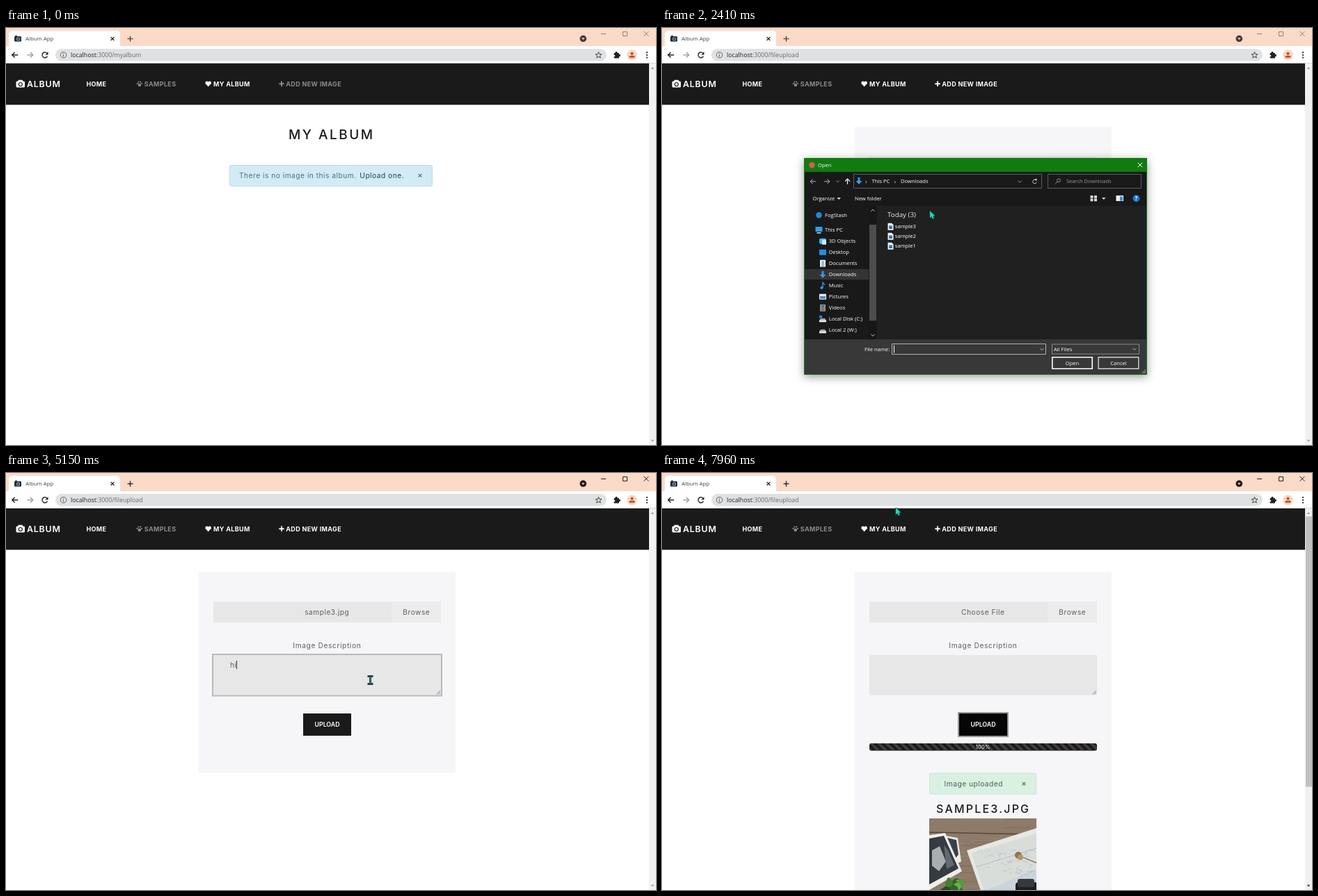
These frames come from a looping animation (934x600 px, 8000 ms). An HTML page with a canvas:

```html
<!DOCTYPE html>
<html lang="en">
<head>
<meta charset="utf-8">
<title>Album App</title>
<style>
html, body { margin: 0; width: 100%; height: 100%; overflow: hidden; background: #fff; }
canvas { display: block; }
</style>
</head>
<body>
<canvas id="stage" width="934" height="600"></canvas>
<script>
const W = 934, H = 600, LOOP = 8000, MAX_SCROLL = 193;
const UI = '"Open Sans", "Noto Sans", sans-serif';
const WEB = 'Inter, Lato, sans-serif';
const screen = document.getElementById('stage').getContext('2d');
let c = screen;

// Drawing helpers
function layer(w, h) {
  const el = document.createElement('canvas');
  el.width = w;
  el.height = h;
  return el.getContext('2d');
}
function rect(x, y, w, h, color, r = 0) {
  c.fillStyle = color;
  c.beginPath();
  c.roundRect(x, y, w, h, r);
  c.fill();
}
function frame(x, y, w, h, color, lw = 1, r = 0) {
  c.strokeStyle = color;
  c.lineWidth = lw;
  c.beginPath();
  c.roundRect(x + lw / 2, y + lw / 2, w - lw, h - lw, r);
  c.stroke();
}
function disc(x, y, r, color) {
  c.fillStyle = color;
  c.beginPath();
  c.arc(x, y, r, 0, 7);
  c.fill();
}
function arc(x, y, r, color, lw, a = 0, b = 2 * Math.PI) {
  c.strokeStyle = color;
  c.lineWidth = lw;
  c.beginPath();
  c.arc(x, y, r, a, b);
  c.stroke();
}
function trace(p) {
  c.beginPath();
  for (let i = 0; i < p.length; i += 2) c.lineTo(p[i], p[i + 1]);
}
function line(color, lw, ...p) {
  c.strokeStyle = color;
  c.lineWidth = lw;
  trace(p);
  c.stroke();
}
function poly(color, ...p) {
  c.fillStyle = color;
  trace(p);
  c.fill();
}
function cross(x, y, r, color, lw = 1) {
  line(color, lw, x - r, y - r, x + r, y + r);
  line(color, lw, x + r, y - r, x - r, y + r);
}
function plus(x, y, r, color, lw) {
  line(color, lw, x - r, y, x + r, y);
  line(color, lw, x, y - r, x, y + r);
}
function chevron(x, y, r, color, dir = 1) {
  line(color, 1, x - r, y - dir * r / 2, x, y + dir * r / 2, x + r, y - dir * r / 2);
}
function arrow(x, y, r, dx, dy, color, lw) {
  const tx = x + dx * r, ty = y + dy * r, k = r * 0.9;
  line(color, lw, x - dx * r, y - dy * r, tx, ty);
  line(color, lw, tx - (dx + dy) * k, ty - (dy + dx) * k, tx, ty, tx - (dx - dy) * k, ty - (dy - dx) * k);
}
function text(s, x, y, font, color, spacing = 0, align = 'left') {
  c.font = font;
  c.fillStyle = color;
  c.letterSpacing = spacing + 'px';
  c.textAlign = align;
  c.fillText(s, align === 'center' ? x + spacing / 2 : x, y);
}
const ui = (s, x, y, color = '#fff', size = 7.6) => text(s, x, y, `${size}px ${UI}`, color);
const body = (s, x, y, color = '#5b6063', align = 'center') =>
  text(s, x, y, `10.2px ${WEB}`, color, 0.5, align);

// Browser window
function drawBrowser(t) {
  const active = (t >= 850 && t < 2030) || t >= 3740;
  const ink = active ? '#222' : '#8f7f76';
  rect(0, 0, W, 27, '#fcdac8');
  rect(4, 4, 160, 30, '#fff', 5);
  rect(0, 26, W, 25, '#fff');
  rect(0, 50, W, 1, '#d9dbdd');
  rect(12, 12, 10, 7.5, '#26303a', 1);
  rect(13, 10.8, 3, 2, '#26303a');
  disc(17.5, 15.8, 2.5, '#8fa3ad');
  disc(17.5, 15.8, 1.4, '#26303a');
  ui('Album App', 28, 18, '#3c4043', 7.8);
  cross(153, 15.3, 2.4, '#222', 1.3);
  plus(178.5, 15.5, 4, active ? '#222' : '#4c423c', 1.3);
  disc(829.3, 15.3, 4.8, active ? '#1d1a18' : '#463c37');
  poly('#fcdac8', 827, 14.2, 831.6, 14.2, 829.3, 17);
  line(ink, 1, 855, 8.5, 862, 8.5);
  frame(886, 5, 7, 7, ink);
  cross(920, 8.3, 3.4, ink);

  arrow(13, 38.8, 4.2, -1, 0, '#222', 1.5);
  arrow(34.5, 38.8, 4.2, 1, 0, '#999', 1.3);
  arc(56, 38.8, 3.9, '#222', 1.5, 0.5, 5.4);
  poly('#222', 60.5, 34.2, 60.5, 38.4, 56.3, 38.4);
  rect(71, 30, 792, 17.5, '#dfe1e2', 8.7);
  arc(82.5, 38.8, 4.2, '#5f6368', 1);
  line('#5f6368', 1.1, 82.5, 38.2, 82.5, 41.3);
  disc(82.5, 36.6, 0.7, '#5f6368');
  text('localhost', 93, 42, `8.8px ${UI}`, '#202124');
  const w = c.measureText('localhost').width;
  text(t < 1100 ? ':3000/myalbum' : ':3000/fileupload', 93 + w, 42, `8.8px ${UI}`, '#666b70');

  const star = [];
  for (let i = 0; i < 11; i++) {
    const a = i * Math.PI / 5 - Math.PI / 2, r = i % 2 ? 2 : 4.7;
    star.push(851.5 + r * Math.cos(a), 39.2 + r * Math.sin(a));
  }
  line('#444', 1, ...star);
  rect(873.5, 36, 7.5, 7.5, '#222', 1);
  disc(877, 35.7, 1.7, '#222');
  disc(881.3, 39.5, 1.7, '#222');
  disc(874, 40, 1.2, '#fff');
  disc(899.5, 38.8, 7.2, '#fbd3bf');
  disc(899.5, 36.7, 2, '#bf4f14');
  rect(895.6, 39.7, 7.8, 3, '#bf4f14', [2, 2, 0, 0]);
  for (const y of [35.2, 38.9, 42.6]) disc(921, y, 1.1, '#222');
}

// Site header
function drawNav(t) {
  const grey = '#8b8b8b', add = t < 850 ? grey : '#fff';
  const item = (s, x, color) => text(s, x, 83.5, `700 9px ${WEB}`, color, 0.35);
  rect(0, 51, 924, 59.5, '#1a1a1a');
  rect(14.5, 76.5, 12.5, 9, '#fff', 1.5);
  rect(17.5, 74.7, 6.5, 3, '#fff', 1);
  arc(20.8, 81, 2.5, '#1a1a1a', 1.2);
  text('ALBUM', 30, 84.7, `600 12.4px ${WEB}`, '#fff', 0.8);
  item('HOME', 115.5, '#fff');
  disc(191.8, 82, 2.3, grey);
  for (const [x, y] of [[188.6, 80], [190.4, 77.6], [193.2, 77.6], [195, 80]]) disc(x, y, 1.1, grey);
  item('SAMPLES', 198.8, grey);
  disc(288.6, 78.9, 2.3, '#fff');
  disc(292.6, 78.9, 2.3, '#fff');
  poly('#fff', 286.5, 79.8, 294.7, 79.8, 290.6, 84.4);
  item('MY ALBUM', 298, '#fff');
  plus(396, 80.3, 3.7, add, 1.9);
  item('ADD NEW IMAGE', 402.3, add);
}

function drawEmptyAlbum() {
  text('MY ALBUM', 466.5, 160.3, `500 19px ${WEB}`, '#1a1a1a', 2.5, 'center');
  rect(321, 197, 292, 31, '#d3ebf5', 3);
  frame(321, 197, 292, 31, '#b9dfea', 1, 3);
  body('There is no image in this album.', 335, 215.5, '#4d707c', 'left');
  body('Upload one.', 508.3, 215.5, '#264049', 'left');
  cross(595, 212.3, 2.3, '#60757d', 1.3);
}

// Photo of a desk in flat shapes
function paintPhoto() {
  const prev = c;
  let seed = 7;
  const rnd = () => (seed = seed * 16807 % 2147483647) / 2147483647;
  c = layer(154, 231);
  rect(0, 0, 154, 231, '#8d7a68');
  for (let i = 0; i < 60; i++)
    rect(rnd() * 150 - 30, rnd() * 231, 20 + rnd() * 50, 1, i % 2 ? '#a08d7a88' : '#6f5d4f77');
  for (const y of [20, 108, 152]) line('#54473c', 1.5, 0, y, 154, y + 3);
  poly('#ece9e2', 18, 24, 41, 28, 46, 62, 30, 70);
  poly('#39424c', 22, 27, 39, 31, 42, 52, 34, 62);
  poly('#efeeea', 0, 24, 23, 21, 47, 76, 0, 103);
  poly('#343b42', 0, 29, 21, 25, 42, 72, 0, 95);
  poly('#a9aeb1', 4, 46, 15, 40, 24, 62, 14, 76, 4, 68);
  poly('#626b72', 21, 38, 27, 46, 36, 67, 25, 73);
  poly('#e7e7e3', 54, 46, 154, 14, 154, 171, 103, 188);
  poly('#c9d5da', 61, 50, 154, 22, 154, 160, 105, 180);
  poly('#d9ddda', 61, 50, 154, 22, 154, 73, 80, 104);
  for (let i = 0; i < 55; i++) {
    const x = 68 + rnd() * 80, y = 45 + rnd() * 38;
    line('#9caab099', 0.7, x, y, x + rnd() * 9, y - 5 + rnd() * 9);
  }
  line('#a6bac3', 0.8, 67, 70, 154, 43);
  line('#a6bac3', 0.8, 89, 135, 132, 116);
  line('#7d6346', 1.2, 132, 55, 154, 64);
  disc(128, 53, 5, '#8f7350');
  disc(131, 56, 4, '#b39568');
  rect(124, 92, 34, 62, '#1c1f21', 4);
  rect(127, 87, 24, 12, '#34393b', 3);
  for (const [r, color] of [[17, '#2d3234'], [14, '#8e9697'], [12, '#171a1c'], [7, '#4e585c'], [4, '#111']])
    disc(143, 124, r, color);
  const greens = ['#2e6428', '#40802f', '#569b3b', '#6cae4e', '#254d24'];
  poly('#2b4f29', 0, 112, 28, 95, 52, 120, 60, 165, 80, 190, 74, 231, 0, 231);
  for (let i = 0; i < 210; i++) {
    const y = 88 + rnd() * 143;
    const edge = y < 110 ? 50 : y < 150 ? 58 : y < 190 ? 74 : 80;
    const x = (y < 108 ? 25 : 0) + rnd() * (edge - (y < 108 ? 25 : 0));
    disc(x, y, 2.5 + rnd() * 3.5, greens[i % 5]);
  }
  const el = c.canvas;
  c = prev;
  return el;
}
const photo = paintPhoto();

// Upload form
function drawForm(t) {
  const done = t >= 6400, loaded = t >= 6650;
  const field = '#e7e7e7', focus = '#bababa';
  rect(276.5, 142.5, 369.5, (loaded ? 770 : done ? 554 : 431) - 142.5, '#f6f6f8');
  rect(298, 185.5, 327, 29.5, field);
  rect(554, 185.5, 71, 29.5, '#ececed');
  if (t >= 3740 && t < 4270) frame(296, 183.5, 331, 33.5, focus, 2);
  body(t >= 3740 && !done ? 'sample3.jpg' : 'Choose File', 461, 203.5);
  body('Browse', 589.5, 203.5);
  text('Image Description', 461, 252, `10.2px ${WEB}`, '#5b6063', 0.62, 'center');
  rect(298, 262, 327, 57.5, field);
  line('#666', 0.8, 618.5, 318.5, 624, 313);
  line('#666', 0.8, 621.5, 318.5, 624, 316);
  if (t >= 4270 && t < 6250) frame(296, 260, 331, 61.5, focus, 2);

  const typed = t < 5070 ? '' : t < 5150 ? 'h' : 'hi';
  if (t >= 4270 && !done) {
    if (typed) body(typed, 322, 280, '#5b6063', 'left');
    const caret = t < 4770 || (t >= 5070 && t < 5610) || (t >= 6100 && t < 6250);
    if (caret) rect([322, 329, 331][typed.length], 270, 1, 12, '#333');
  }

  if (t >= 6250) {
    rect(425, 344, 73, 36, '#979797');
    rect(427, 346, 69, 32, '#060606');
  } else rect(427, 346, 69, 32, t >= 6030 ? '#060606' : '#1a1a1a');
  text('UPLOAD', 461.5, 365, `600 8.8px ${WEB}`, '#fff', 0, 'center');

  if (t >= 6325) {
    c.save();
    c.beginPath();
    c.roundRect(298, 389, done ? 327 : 170, 10.5, 3);
    c.clip();
    rect(298, 389, 327, 11, '#1a1a1a');
    for (let x = 287; x < 626; x += 10.9)
      poly('#403d3c', x, 389, x + 5.4, 389, x + 15.9, 399.5, x + 10.5, 399.5);
    c.restore();
    if (done) text('100%', 461, 396.8, `7.6px ${WEB}`, '#fff', 0.2, 'center');
  }
  if (done) {
    rect(384, 431.5, 154.5, 31, '#d9f0e2', 3);
    frame(384, 431.5, 154.5, 31, '#cdebd8', 1, 3);
    body('Image uploaded', 447.5, 450.5, '#4d6356');
    cross(520, 447.3, 2.3, '#61766a', 1.3);
    text('SAMPLE3.JPG', 460.5, 488.5, `500 16px ${WEB}`, '#1a1a1a', 2.2, 'center');
  }
  if (loaded) c.drawImage(photo, 384, 497);
}

function drawScrollbar(t, scroll) {
  const long = t >= 6650, off = '#a5a5a5', on = '#505050';
  rect(924, 51, 10, 549, '#f1f1f1');
  if (long) rect(925, 62.6 + scroll * 525.8 / 742, 9, 389, '#c1c1c1');
  poly(long && scroll > 0 ? on : off, 926.5, 59, 931.5, 59, 929, 56);
  poly(long && scroll < MAX_SCROLL ? on : off, 926.5, 592.5, 931.5, 592.5, 929, 595.5);
}

// File dialog
const FOLDERS = ['3D Objects', 'Desktop', 'Documents', 'Downloads', 'Music',
  'Pictures', 'Videos', 'Local Disk (C:)', 'Local 2 (W:)'];
const blue = '#2f9fe8';

function downIcon(x, y) {
  rect(x - 1.5, y - 5, 3, 6, blue);
  poly(blue, x - 4.5, y, x + 4.5, y, x, y + 5);
}
function folderIcon(i, x, y) {
  if (i === 0) {
    rect(x - 5, y - 4, 10, 8, '#49b8ea', 2);
    rect(x - 1, y - 2, 6, 7, '#c9ecfb', 1);
  } else if (i === 1) rect(x - 5, y - 4, 10, 8, '#1e90e4', 0.5);
  else if (i === 2) {
    rect(x - 4, y - 5, 8, 10, '#e9f2f7');
    for (let k = -3; k < 4; k += 2) rect(x - 2, y + k, 4, 1, '#4a90b8');
  } else if (i === 3) downIcon(x, y);
  else if (i === 4) {
    disc(x - 1.5, y + 3, 2, blue);
    line(blue, 1.3, x, y + 3, x, y - 4.5, x + 3, y - 1);
  } else if (i === 5) {
    rect(x - 5, y - 4, 10, 8, '#eef4f8');
    rect(x - 4, y - 1, 8, 4, '#4f8db8');
  } else if (i === 6) {
    rect(x - 4, y - 5, 8, 10, '#8a9297');
    rect(x - 2, y - 4, 4, 3.5, '#3676a8');
    rect(x - 2, y + 0.5, 4, 3.5, '#a7643a');
  } else {
    poly('#aaa', x - 3, y - 1, x + 3, y - 1, x + 5, y + 2, x - 5, y + 2);
    rect(x - 5, y + 1.5, 10, 3, '#e3e3e3');
    if (i === 7) rect(x - 5, y - 5, 4, 3.5, '#1e90e4');
  }
}

function drawDialog(t) {
  const dim = '#9a9a9a', dark = '#191919';
  c.clearRect(0, 0, W, H);
  c.save();
  c.shadowColor = 'rgba(0,0,0,.4)';
  c.shadowBlur = 12;
  c.shadowOffsetY = 3;
  rect(204, 187, 493, 312, '#107c10');
  c.restore();
  rect(205, 207, 491, 49, dark);
  rect(205, 256, 104, 192, dark);
  rect(309, 256, 387, 192, '#202020');
  rect(205, 448, 491, 50, '#383838');
  disc(215.5, 197.3, 4.2, '#e2574c');
  ui('Open', 224, 200);
  cross(687, 197, 3.2, '#fff');

  arrow(217, 220.8, 3.8, -1, 0, '#bbb', 1);
  arrow(237, 220.8, 3.8, 1, 0, '#bbb', 1);
  chevron(252.5, 220.8, 2, dim);
  arrow(266.5, 221, 3.8, 0, -1, '#fff', 1.2);
  frame(275, 210, 271, 21, '#5b5b5b');
  downIcon(283, 220);
  ui('›', 292, 223.5, '#ccc', 9);
  ui('This PC', 301.5, 223.3);
  ui('›', 333.5, 223.5, '#ccc', 9);
  ui('Downloads', 343, 223.3);
  chevron(514, 221, 2.8, dim);
  arc(535.5, 221, 2.8, '#bbb', 1, 0.2, 5.3);
  poly('#bbb', 535, 217, 539, 217, 538, 220.5);
  frame(554, 210, 135, 21, '#5b5b5b');
  arc(570, 219.3, 2.4, dim, 0.9);
  line(dim, 0.9, 568.2, 221.2, 565, 224.5);
  ui('Search Downloads', 581, 223.3, dim, 7.5);

  ui('Organize', 216.5, 248);
  poly('#ddd', 251.5, 244, 257, 244, 254.2, 247);
  ui('New folder', 277, 248);
  for (const x of [615.5, 621]) for (const y of [241, 245.5]) rect(x, y, 4, 3.8, '#ddd');
  poly('#ddd', 632, 244, 637.5, 244, 634.8, 247);
  rect(652.5, 241, 10.5, 8, '#eee');
  rect(658, 242.5, 4, 6, '#1e90e4');
  disc(681.5, 245.3, 5, '#1877d2');
  text('?', 681.5, 248.2, `700 8px ${UI}`, '#fff', 0, 'center');

  disc(225.5, 269.3, 4.2, '#1a8be0');
  ui('FogStash', 234, 272);
  rect(220.5, 286, 10, 7, blue);
  rect(222.5, 294, 6, 1.5, '#cfe6f5');
  ui('This PC', 234, 293.2);
  rect(205, 347, 92, 15, '#343434');
  FOLDERS.forEach((name, i) => {
    const y = 306.7 + i * 16;
    folderIcon(i, 231, y);
    ui(name, 239.7, y + 2.7);
  });
  rect(298, 256, 10, 192, '#171717');
  rect(298, 283, 10, 138, '#4d4d4d');
  chevron(303, 262.5, 2.6, '#ccc', -1);
  chevron(303, 442, 2.6, '#ccc');

  ui('Today (3)', 324, 272, '#e8e8e8', 9.8);
  if (t >= 2600) rect(321, 279, 47, 13.5, t >= 2680 ? '#626262' : '#4d4d4d');
  ['sample3', 'sample2', 'sample1'].forEach((name, i) => {
    const y = 285.7 + i * 14;
    poly('#f4f4f4', 324.5, y - 5, 330, y - 5, 332.5, y - 2.5, 332.5, y + 5, 324.5, y + 5);
    if (t >= 2250) {
      rect(326, y - 1.5, 5, 4.5, '#3b8fd0');
      poly('#1d5d92', 326, y + 3, 328.7, y, 331, y + 3);
    }
    ui(name, 334.8, y + 2.5);
  });

  ui('File name:', 291, 465);
  frame(330, 454, 222, 16, '#b0b0b0');
  if (t >= 2710) ui('sample3', 333, 465);
  else rect(333, 456.5, 1, 11, '#fff');
  chevron(546, 462.3, 2.6, '#bbb');
  frame(560, 454.5, 126, 15, '#8b8b8b');
  ui('All Files', 563, 465);
  chevron(679, 462, 2.6, '#bbb');
  frame(560, 473, 59, 18, '#fff', 1.6);
  text('Open', 589.5, 484.8, `7.6px ${UI}`, '#fff', 0, 'center');
  frame(626.5, 473, 59, 18, '#d0d0d0', 1.4);
  text('Cancel', 656, 484.8, `7.6px ${UI}`, '#fff', 0, 'center');
  for (let i = 0; i < 3; i++)
    for (let k = 0; k <= i; k++) rect(693.5 - k * 2, 491.5 + i * 2, 1.2, 1.2, '#bbb');
}

const dialog = layer(W, H);
function showDialog(t) {
  if (t < 2110 || t >= 3890) return;
  let alpha = 1, scale = 1;
  if (t < 2190) [alpha, scale] = [0.71, 0.986];
  else if (t >= 3815) [alpha, scale] = [0.15, 0.95];
  else if (t >= 3740) [alpha, scale] = [0.6, 0.975];
  c = dialog;
  drawDialog(t);
  c = screen;
  c.save();
  c.globalAlpha = alpha;
  c.translate(450.5, 343);
  c.scale(scale, scale);
  c.drawImage(dialog.canvas, -450.5, -343);
  c.restore();
}

// Pointer: time, x, y
const PATH = [
  [150, 640, 495], [850, 440, 82], [1020, 440, 82], [1170, 520, 212], [1400, 520, 212],
  [1470, 470, 196], [1640, 470, 196], [1950, 471, 275], [2190, 471, 275], [2470, 374, 262],
  [2640, 352, 284], [2880, 352, 284], [3420, 599.5, 483.5], [3740, 599.5, 483.5],
  [4030, 523.5, 298], [5780, 523.5, 298], [6080, 472.5, 348], [7690, 472.5, 348],
  [7950, 336, 50], [8000, 336, 50]
];
const clamp = u => Math.max(0, Math.min(1, u));
const smooth = u => u * u * (3 - 2 * u);
const quad = u => u < 0.5 ? 2 * u * u : 1 - 2 * (1 - u) ** 2;

function pointerShape(t) {
  if (t > 3960 && t < 6030) return 'beam';
  if ((t > 800 && t < 1100) || (t > 1170 && t < 1750) || (t >= 6030 && t < 7700)) return 'hand';
  return 'arrow';
}
function drawPointer(t) {
  if (t < PATH[0][0]) return;
  const i = PATH.findIndex(p => p[0] > t);
  const [t0, x0, y0] = PATH[i - 1], [t1, x1, y1] = PATH[i];
  const u = smooth((t - t0) / (t1 - t0));
  const shape = pointerShape(t), teal = '#12e2bd', edge = '#0d4a45';
  c.save();
  c.translate(x0 + (x1 - x0) * u, y0 + (y1 - y0) * u);
  c.lineJoin = 'round';
  if (shape === 'beam') {
    line('#16494d', 3, -4, -5.5, 4, -5.5);
    line('#16494d', 3, -4, 5.5, 4, 5.5);
    line('#16494d', 3, 0, -5, 0, 5);
    line('#4f9a9a', 0.9, 0, -5, 0, 5);
  } else {
    const p = shape === 'arrow'
      ? [0, 0, 0, 9.5, 2.2, 7.7, 3.9, 11, 5.6, 10.1, 4, 7, 6.8, 6.8, 0, 0]
      : [-1, 0.5, 0.6, 0.5, 1.2, 4.3, 5.5, 5.5, 6, 8, 4.8, 13, -0.6, 13, -4, 8.6, -3, 7.4, -0.6, 8.8, -1, 0.5];
    line(edge, 1.6, ...p);
    poly(teal, ...p);
  }
  c.restore();
}

function scrollAt(t) {
  return MAX_SCROLL * (quad(clamp((t - 6690) / 560)) - quad(clamp((t - 7340) / 400)));
}

function draw(t) {
  const scroll = scrollAt(t);
  rect(0, 0, W, H, '#fff');
  c.save();
  c.translate(0, -scroll);
  drawNav(t);
  if (t < 1100) drawEmptyAlbum();
  else drawForm(t);
  c.restore();
  drawScrollbar(t, scroll);
  drawBrowser(t);
  if (t >= 1020 && t < 1170) {
    rect(0, 585, 96, 15, '#dee1e6', [0, 3, 0, 0]);
    ui('localhost:3000/fileupload', 4, 595, '#5f6368', 7);
  }
  showDialog(t);
  drawPointer(t);
}

function tick() {
  draw(performance.now() % LOOP);
  requestAnimationFrame(tick);
}
tick();
</script>
</body>
</html>
```
